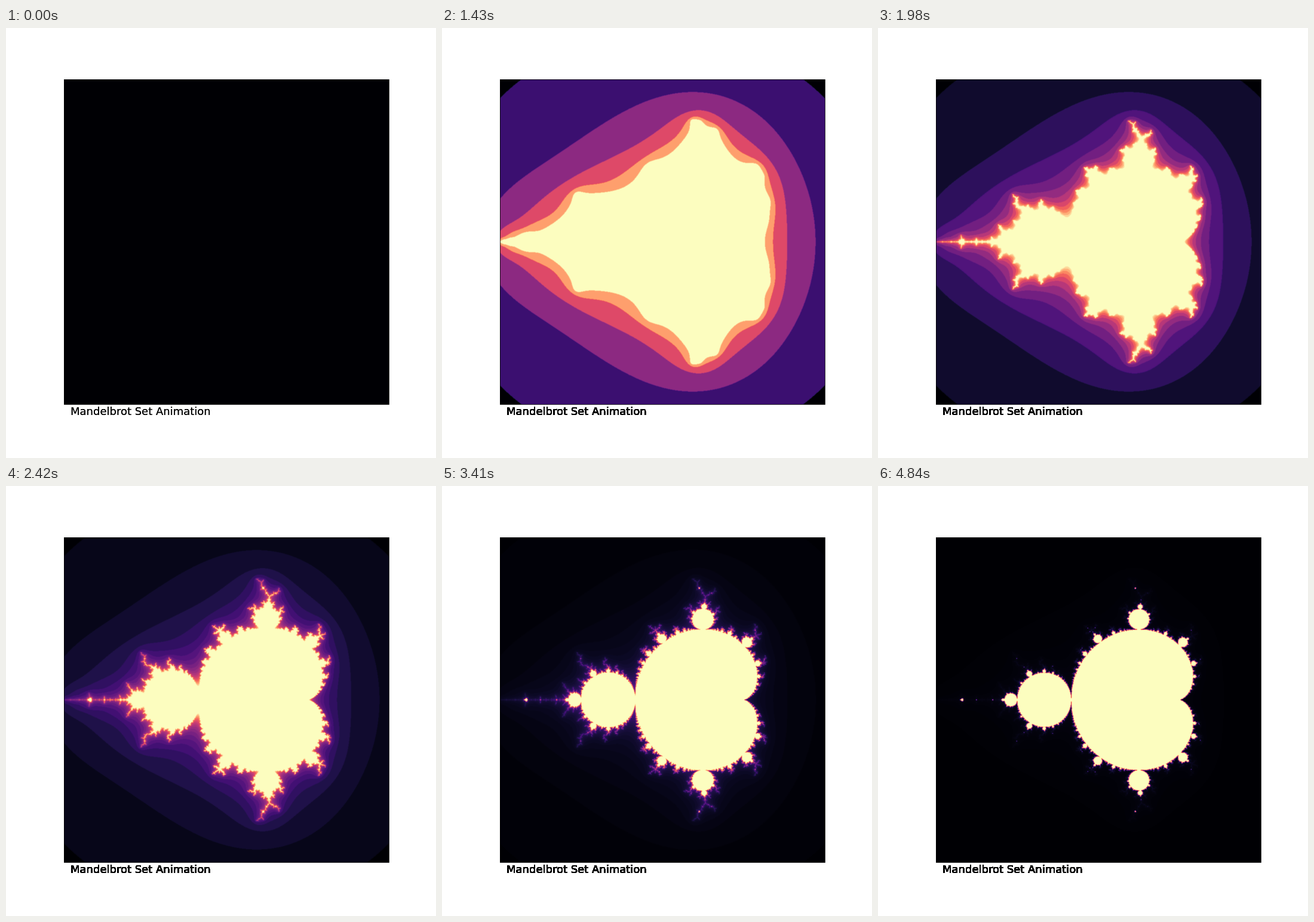
Animation, 720 px wide and 720 px high, one loop 4.95 s. Source, as an HTML page with a canvas:

```html
<!DOCTYPE html>
<html lang="en">
<head>
<meta charset="utf-8">
<title>Mandelbrot Set Animation</title>
<style>
  html, body { margin: 0; width: 100%; height: 100%; overflow: hidden; background: #fff; }
  canvas { display: block; }
</style>
</head>
<body>
<canvas id="stage" width="720" height="720"></canvas>
<script>
const STEP = 110, STEPS = 45;
const GRID = 750, SIZE = 544, LEFT = 97, TOP = 86;
const limitAt = step => Math.round(1.15 ** (step + 1));
const ctx = document.getElementById('stage').getContext('2d');

// Magma colour map: 16 even stops, interpolated to 256 entries
const stops = ('000004 0b0924 20114b 3b0f70 57157e 721f81 8c2981 a8327d ' +
  'c43c75 de4968 f1605d fa7f5e fe9f6d febf84 fddea0 fcfdbf').split(' ')
  .map(hex => [0, 2, 4].map(i => parseInt(hex.substr(i, 2), 16)));
const palette = Array.from({ length: 256 }, (_, i) => {
  const a = Math.min(14, Math.floor(i / 17)), f = i / 17 - a;
  return stops[a].map((v, c) => Math.round(v + (stops[a + 1][c] - v) * f));
});

function escapeCount(cx, cy, last) {
  let x = 0, y = 0;
  for (let i = 0; i < last; i++) {
    const nx = x * x - y * y + cx;
    y = 2 * x * y + cy;
    x = nx;
    if (x * x + y * y > 16) return i;
  }
  return last;
}

// Counts at the highest limit; lower limits only cap them
const counts = new Float64Array(GRID * GRID);
const lastCount = limitAt(STEPS - 1) - 1;
for (let row = 0; row < GRID; row++)
  for (let col = 0; col < GRID; col++)
    counts[row * GRID + col] = escapeCount(
      -2 + 3 * col / (GRID - 1), -1.5 + 3 * row / (GRID - 1), lastCount);

// Cubic B-spline taps for scaling GRID samples down to SIZE
const ratio = GRID / SIZE;
const spline = a => a < 1 ? 2 / 3 - a * a + a * a * a / 2 : a < 2 ? (2 - a) ** 3 / 6 : 0;
const taps = Array.from({ length: SIZE }, (_, p) => {
  const mid = (p + 0.5) * ratio - 0.5, list = [];
  for (let i = Math.ceil(mid - 2 * ratio); i <= mid + 2 * ratio; i++)
    list.push({ at: Math.max(0, Math.min(GRID - 1, i)), w: spline(Math.abs(i - mid) / ratio) });
  const sum = list.reduce((s, tap) => s + tap.w, 0);
  return { at: list.map(tap => tap.at), w: list.map(tap => tap.w / sum) };
});

// Shrinks each row and transposes, so two passes restore the orientation
function shrink(src, rows) {
  const out = new Float64Array(rows * SIZE);
  for (let p = 0; p < SIZE; p++) {
    const { at, w } = taps[p];
    for (let row = 0; row < rows; row++) {
      let sum = 0;
      for (let k = 0; k < at.length; k++) sum += w[k] * src[row * GRID + at[k]];
      out[p * rows + row] = sum;
    }
  }
  return out;
}

const image = ctx.createImageData(SIZE, SIZE);

function drawSet(limit) {
  const cap = Math.max(1, limit - 1), span = cap - 1 || 1;
  const values = shrink(shrink(counts.map(n => Math.min(n, cap)), GRID), SIZE);
  values.forEach((value, i) => {
    const level = Math.floor((value - 1) / span * 256 + 1e-4);
    image.data.set(palette[Math.max(0, Math.min(255, level))], i * 4);
    image.data[i * 4 + 3] = 255;
  });
  ctx.putImageData(image, LEFT, TOP);
}

function draw(step) {
  ctx.fillStyle = '#fff';
  ctx.fillRect(0, 0, 720, 720);
  drawSet(limitAt(step));
  ctx.strokeStyle = ctx.fillStyle = '#000';
  ctx.lineWidth = 0.8;
  ctx.strokeRect(LEFT + 0.5, TOP + 0.5, SIZE, SIZE);
  // The caption is stacked once more per step, which hardens its edges
  ctx.font = '18px "DejaVu Sans", sans-serif';
  for (let i = 0; i < step + 2; i++) ctx.fillText('Mandelbrot Set Animation', 108, 648);
}

let shown = -1;
function tick() {
  const step = Math.floor(performance.now() / STEP) % STEPS;
  if (step !== shown) draw(shown = step);
  requestAnimationFrame(tick);
}
tick();
</script>
</body>
</html>
```
